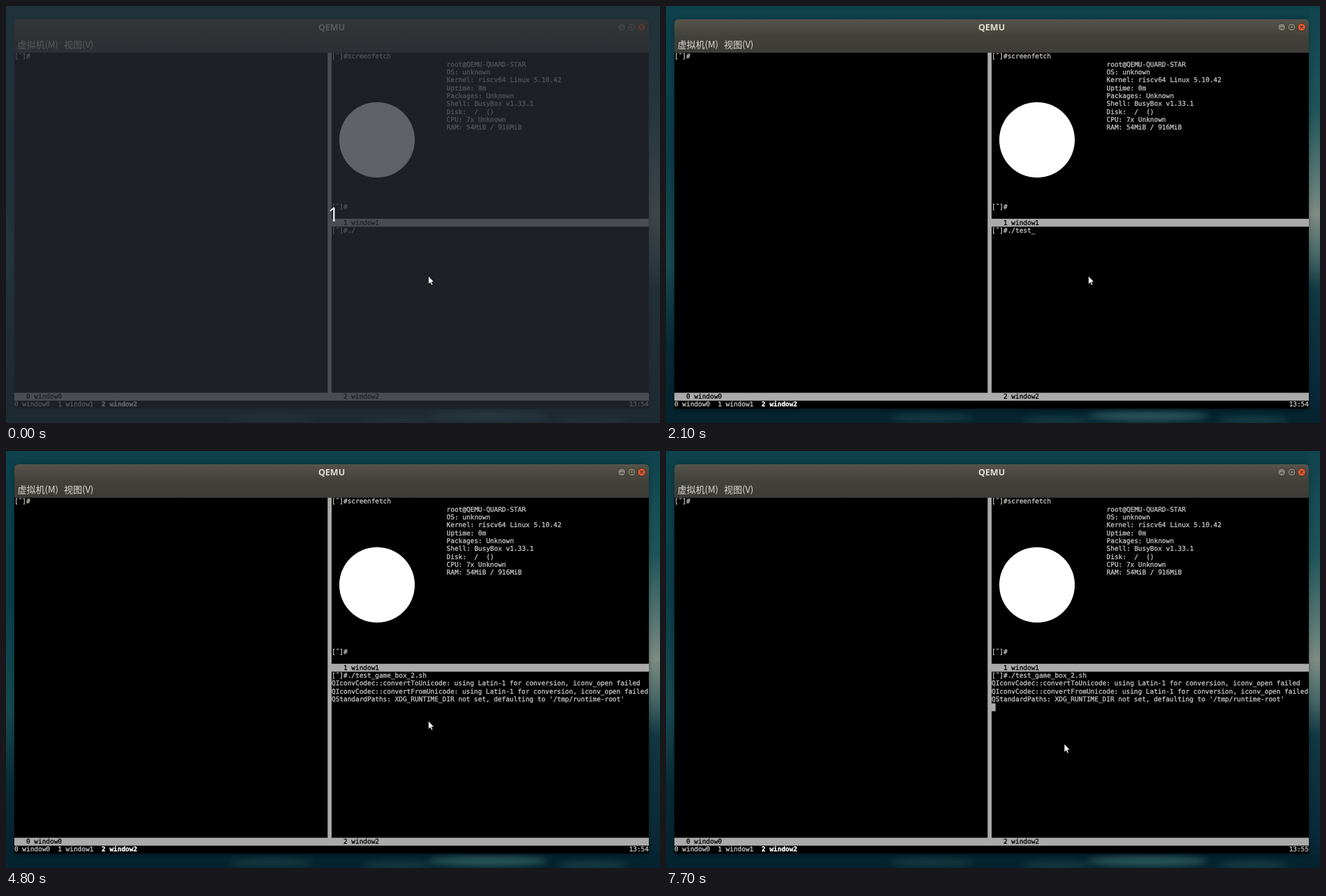
An HTML page that plays this animation: 936 by 598 pixels, repeating every 8 s.

```html
<!DOCTYPE html>
<html lang="zh">
<head>
<meta charset="utf-8">
<title>QEMU</title>
<style>
html, body { margin: 0; width: 100%; height: 100%; overflow: hidden; background: #082c3a; }
svg { display: block; width: 936px; height: 598px; }
#screen text {
  font: 9.426px "DejaVu Sans Mono", monospace;
  white-space: pre;
  text-rendering: geometricPrecision;
  stroke-width: .3px;
}
.menu { font: 13px "Noto Sans CJK SC", "Noto Sans CJK", sans-serif; fill: #dfdbd2; }
.title { font: bold 12.5px "Open Sans", sans-serif; fill: #dfdbd2; }
.count { font: 500 27px "Open Sans", sans-serif; fill: #fff; }
</style>
</head>
<body>
<svg viewBox="0 0 936 598" xmlns="http://www.w3.org/2000/svg">
  <defs>
    <linearGradient id="left" x2="0" y2="1">
      <stop offset="0" stop-color="#0d414c"/>
      <stop offset=".35" stop-color="#0a3d48"/>
      <stop offset=".62" stop-color="#184a50"/>
      <stop offset=".8" stop-color="#082c38"/>
      <stop offset="1" stop-color="#05212d"/>
    </linearGradient>
    <linearGradient id="right" x2="0" y2="1">
      <stop offset="0" stop-color="#0f434d"/>
      <stop offset=".25" stop-color="#1f5559"/>
      <stop offset=".42" stop-color="#5c7975"/>
      <stop offset=".5" stop-color="#7d8c83"/>
      <stop offset=".6" stop-color="#466666"/>
      <stop offset=".68" stop-color="#123842"/>
      <stop offset="1" stop-color="#062432"/>
    </linearGradient>
    <linearGradient id="bar" x2="0" y2="1">
      <stop offset="0" stop-color="#56544b"/>
      <stop offset=".5" stop-color="#42413a"/>
      <stop offset="1" stop-color="#3c3b37"/>
    </linearGradient>
    <filter id="soft" x="-5%" y="-5%" width="110%" height="110%"><feGaussianBlur stdDeviation="4"/></filter>
    <filter id="mist" x="-20%" y="-60%" width="140%" height="220%"><feGaussianBlur stdDeviation="5"/></filter>
  </defs>
  <rect width="936" height="598" fill="#0d414c"/>
  <rect width="12" height="598" fill="url(#left)"/>
  <rect x="920" width="16" height="598" fill="url(#right)"/>
  <rect y="577" width="936" height="21" fill="#05242f"/>
  <g fill="#2a545a" filter="url(#mist)">
    <ellipse cx="380" cy="590" rx="60" ry="5" opacity=".5"/>
    <ellipse cx="560" cy="594" rx="50" ry="5" opacity=".5"/>
    <ellipse cx="690" cy="588" rx="85" ry="7"/>
    <ellipse cx="840" cy="594" rx="50" ry="5" opacity=".6"/>
  </g>
  <path d="M14 577V28Q14 21 20 21H912Q918 21 918 28V577Z" fill="#000" opacity=".55" filter="url(#soft)"/>
  <path d="M12 68V25Q12 19 18 19H914Q920 19 920 25V68Z" fill="url(#bar)"/>
  <text class="title" x="466" y="35.3" text-anchor="middle">QEMU</text>
  <text class="menu" x="16.5" y="59.8">虚拟机(M)</text>
  <text class="menu" x="83" y="59.8">视图(V)</text>
  <g stroke="#33322c" stroke-width="1">
    <circle cx="881.2" cy="30.3" r="5.6" fill="#827f75"/>
    <circle cx="895.5" cy="30.3" r="5.6" fill="#827f75"/>
    <circle cx="909.7" cy="30.3" r="5.6" fill="#e6582e"/>
    <path d="M878.6 31.5h5.2M893.2 28.2h4.6v4.2h-4.6zM907.6 28.2l4.2 4.2m0-4.2l-4.2 4.2" fill="none" stroke-width="1.1"/>
  </g>
  <rect x="12" y="67" width="908" height="510.3" fill="#000"/>
  <g id="screen"></g>
  <g id="countdown">
    <rect width="936" height="598" fill="#282d34" opacity=".74"/>
    <text class="count" x="461" y="309">1</text>
  </g>
  <path id="mouse" d="M0 0V12L2.7 9.6L4.5 13.4L6.4 12.5L4.7 8.8H8.2Z" fill="#fff" stroke="#000" stroke-width=".7"/>
</svg>
<script>
const NS = 'http://www.w3.org/2000/svg';
const LOOP = 8000, CW = 5.675, CH = 11.34;
const GREY = '#aaa', TEXT = '#c4c4c4';
const screen = document.getElementById('screen');
const countdown = document.getElementById('countdown');
const mouse = document.getElementById('mouse');

const colX = c => 12 + c * CW;
const rowY = r => 67 + r * CH;

function add(tag, attrs) {
  const el = document.createElementNS(NS, tag);
  for (const k in attrs) el.setAttribute(k, attrs[k]);
  return screen.appendChild(el);
}
function block(col, row, cols, rows = 1) {
  return add('rect', { x: colX(col), y: rowY(row), width: cols * CW, height: rows * CH, fill: GREY });
}
function print(col, row, str, fill = TEXT, weight = 400) {
  const el = add('text', { x: colX(col), y: rowY(row) + 8.4, fill, stroke: fill, style: `font-weight:${weight}` });
  el.textContent = str;
  return el;
}

const PROMPT = '[\u02dc]#';
block(79, 0, 1, 44);
block(80, 21, 80);
block(0, 43, 160);
print(0, 0, PROMPT);
print(80, 0, PROMPT + 'screenfetch');
[
  'root@QEMU-QUARD-STAR',
  'OS: unknown',
  'Kernel: riscv64 Linux 5.10.42',
  'Uptime: 0m',
  'Packages: Unknown',
  'Shell: BusyBox v1.33.1',
  'Disk:  /  ()',
  'CPU: 7x Unknown',
  'RAM: 54MiB / 916MiB'
].forEach((line, i) => print(109, i + 1, line));
add('circle', { cx: 531, cy: 192, r: 54, fill: '#fff' });
print(80, 19, PROMPT);
print(83, 21, '1 window1', '#000');
print(3, 43, '0 window0', '#000');
print(83, 43, '2 window2', '#000');
print(0, 44, '0 window0  1 window1');
print(22, 44, '2 window2', '#fff', 700);

const clock = print(155, 44, '13:54');
const command = print(80, 22, '');
const output = [23, 24, 25].map(row => print(80, row, ''));
const caret = block(80, 22, 1);

const CMD = './test_game_box_2.sh';
const LOG = [
  'QIconvCodec::convertToUnicode: using Latin-1 for conversion, iconv_open failed',
  'QIconvCodec::convertFromUnicode: using Latin-1 for conversion, iconv_open failed',
  "QStandardPaths: XDG_RUNTIME_DIR not set, defaulting to '/tmp/runtime-root'"
];

// Each track lists [start time, value]; a value holds until the next start.
const TYPED = [[0, 2], [1100, 3], [1500, 7], [2500, 10], [2600, 15], [3300, 16], [3500, 17], [3600, 20]];
const LOGGED = [
  [[0, 0], [4400, 99]],
  [[0, 0], [4500, 99]],
  [[0, 0], [4600, 16], [4800, 99]]
];
const CARET = [
  [0, null], [1300, [87, 22]], [1500, null], [1800, [91, 22]], [2100, null], [2300, [91, 22]],
  [2500, null], [3000, [99, 22]], [3300, null], [3600, [105, 22]], [3800, null], [3900, [105, 22]],
  [4300, null], [5000, [80, 26]], [5200, null], [6100, [80, 26]], [6500, null],
  [6600, [10, 44]], [6700, null], [6800, [80, 26]], [7000, null], [7700, [80, 26]]
];
const MOUSE = [[0, [604.5, 387]], [6100, [599, 387]], [6200, [585, 403]], [6300, [570, 420]]];

function at(track, t) {
  let value;
  for (const [start, v] of track) if (t >= start) value = v;
  return value;
}

function draw(t) {
  countdown.style.display = t < 100 ? '' : 'none';
  command.textContent = PROMPT + CMD.slice(0, at(TYPED, t));
  output.forEach((el, i) => { el.textContent = LOG[i].slice(0, at(LOGGED[i], t)); });
  clock.textContent = t < 6700 ? '13:54' : '13:55';
  const cell = at(CARET, t);
  caret.style.display = cell ? '' : 'none';
  if (cell) {
    caret.setAttribute('x', colX(cell[0]));
    caret.setAttribute('y', rowY(cell[1]));
  }
  mouse.setAttribute('transform', `translate(${at(MOUSE, t)})`);
}

const begin = performance.now();
function tick() {
  draw((performance.now() - begin) % LOOP);
  requestAnimationFrame(tick);
}
tick();
</script>
</body>
</html>
```
